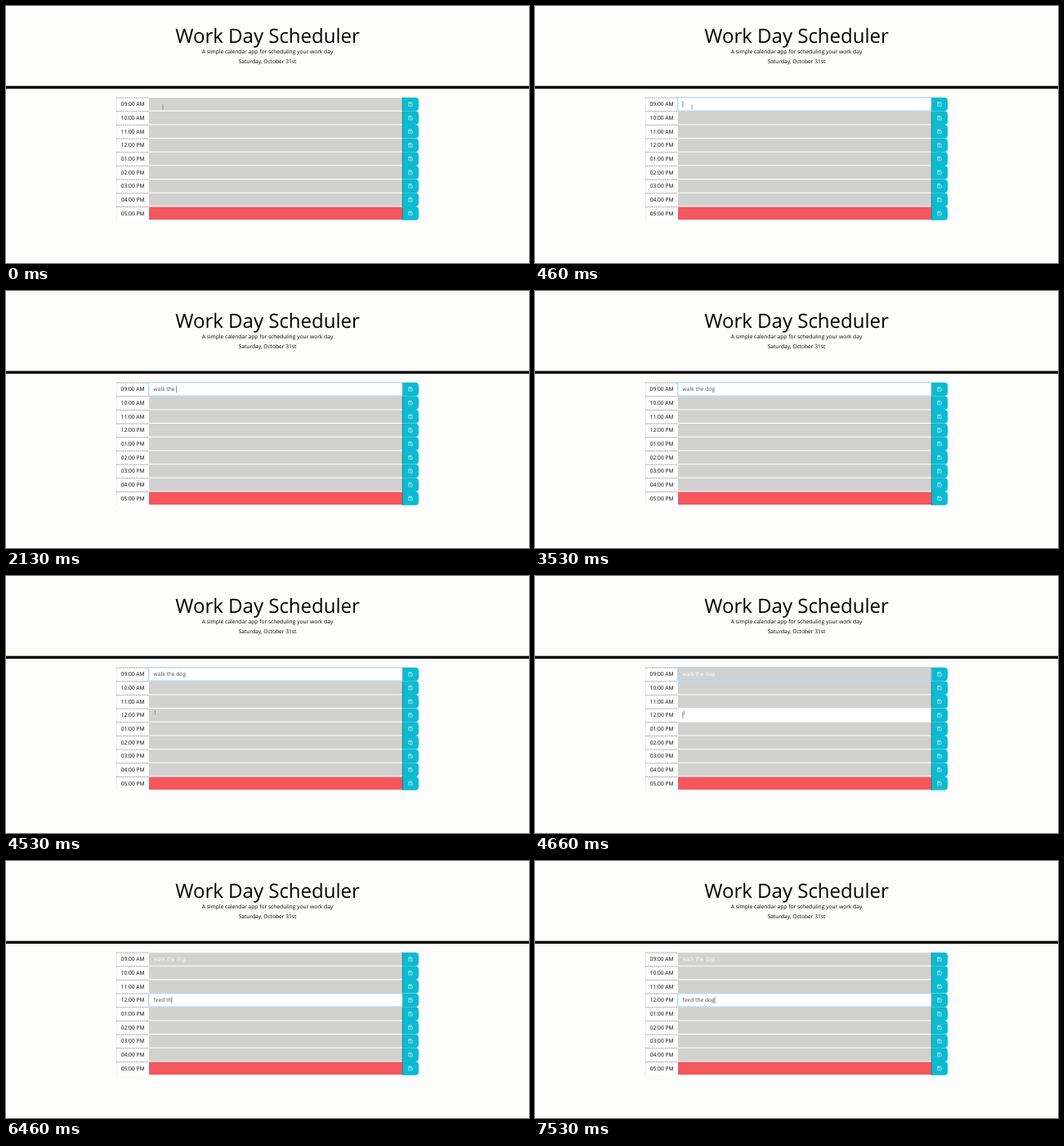
Animation, 640 px wide and 314 px high, one loop 8000 ms. Source, as an HTML page:

```html
<!DOCTYPE html>
<html lang="en">
<head>
<meta charset="utf-8">
<title>Work Day Scheduler</title>
<style>
  html, body { margin: 0; width: 100%; height: 100%; overflow: hidden; background: #fdfdfc; }
  svg { display: block; width: 640px; height: 314px; }
  text { font: 6.667px "Open Sans", sans-serif; text-rendering: geometricPrecision; }
  .mid { text-anchor: middle; }
  .title { font-size: 24px; }
  .focus { fill: none; stroke: #92c3f0; stroke-width: .9; }
  .icon { fill: none; stroke: #d9f4f7; stroke-width: .6; }
</style>
</head>
<body>
<svg id="stage" viewBox="0 0 640 314">
  <text class="mid title" x="320" y="45">Work Day Scheduler</text>
  <text class="mid" x="320" y="58.3">A simple calendar app for scheduling your work day</text>
  <text class="mid" x="320" y="70.3">Saturday, October 31st</text>
  <rect y="97.7" width="640" height="3.4"/>
</svg>
<script>
const stage = document.getElementById('stage');
const LOOP = 8000, TOP = 111.7, PITCH = 16.667, TEXT_X = 180.6;
const GRAY = '#d1d1d0', RED = '#f5575f', TEAL = '#0cbbd0';

function add(tag, attrs, text = '') {
  const el = document.createElementNS('http://www.w3.org/2000/svg', tag);
  set(el, attrs);
  el.textContent = text;
  return stage.appendChild(el);
}
function set(el, attrs) {
  for (const k in attrs) el.setAttribute(k, attrs[k]);
}

const hours = ['09:00 AM', '10:00 AM', '11:00 AM', '12:00 PM', '01:00 PM',
  '02:00 PM', '03:00 PM', '04:00 PM', '05:00 PM'];

const fields = hours.map((hour, i) => {
  const y = TOP + i * PITCH;
  add('rect', { x: 135, y, width: 370, height: PITCH, fill: '#fff', rx: 4 });
  add('path', { d: `M135.3 ${y + .4}v${PITCH}`, stroke: '#ddd', 'stroke-width': .5 });
  add('path', { d: `M135 ${y + .4}h40`, stroke: '#444', 'stroke-width': .6, 'stroke-dasharray': '1 .6' });
  add('text', { class: 'mid', x: 155.1, y: y + 10.7 }, hour);
  const field = add('rect', { x: 175, y: y + .4, width: 310, height: 15.6, fill: i < 8 ? GRAY : RED });
  add('path', {
    d: `M485 ${y}h15.7q4.3 0 4.3 4.3v${PITCH - 8.6}q0 4.3 -4.3 4.3h-15.7z`, fill: TEAL
  });
  add('path', { d: `M485.2 ${y}v${PITCH}`, stroke: '#1c5f69', 'stroke-width': .6 });
  add('path', {
    class: 'icon',
    d: `M492.7 ${y + 6}h3.4l1.1 1.1v3.5h-4.5zM493.6 ${y + 6}v1.5h2.1v-1.5M494.4 ${y + 9}h1.1`
  });
  return field;
});

// Each entry: row, focus and blur times, typed text with the time of every key
const entries = [
  { row: 0, from: 260, to: 4600, text: 'walk the dog',
    keys: [1130, 1200, 1260, 1400, 1460, 1600, 1730, 2000, 2130, 2530, 2660, 3060] },
  { row: 3, from: 4600, to: LOOP, text: 'feed the dog',
    keys: [5460, 5600, 5800, 6060, 6200, 6400, 6460, 6600, 6730, 6800, 7330, 7530] }
];
const caretOff = [[0, 260], [730, 1130], [3530, 3930], [4530, 4600], [5200, 5460], [7260, 7330]];

for (const e of entries) {
  e.y = TOP + e.row * PITCH;
  e.glow = add('rect', { class: 'focus', x: 174.8, y: e.y + .1, width: 310.4, height: 16.3, rx: .6 });
  e.label = add('text', { x: TEXT_X, y: e.y + 10.7 });
}
const caret = add('path', { stroke: '#444', 'stroke-width': .6 });
const pointer = add('path', {
  d: 'M-.8 -2.6Q0 -2.6 0 -2V2Q0 2.6 -.8 2.6M.8 -2.6Q0 -2.6 0 -2V2Q0 2.6 .8 2.6',
  fill: 'none', stroke: '#777', 'stroke-width': .4
});

const within = (t, [a, b]) => t >= a && t < b;
const ramp = (t, start, span) => Math.min(1, Math.max(0, (t - start) / span));
const ease = p => p * p * (3 - 2 * p);

function draw(t) {
  for (const e of entries) {
    const active = within(t, [e.from, e.to]);
    const typed = e.text.slice(0, e.keys.filter(k => k <= t).length);
    e.label.textContent = typed.replace(/ /g, '\u00a0');
    set(e.label, { fill: active ? '#495057' : '#fff' });
    set(fields[e.row], { fill: active ? '#fff' : GRAY });
    set(e.glow, { opacity: ease(ramp(t, e.from + 40, 150)) - ease(ramp(t, e.to + 40, 150)) });
    if (active) {
      const x = TEXT_X + .3 + (typed ? e.label.getComputedTextLength() : 0);
      set(caret, { d: `M${x} ${e.y + 4.3}v8` });
    }
  }
  set(caret, { opacity: caretOff.some(s => within(t, s)) ? 0 : 1 });

  const move = ease(ramp(t, 3930, 330));
  set(pointer, {
    transform: `translate(${192 - 9.5 * move} ${123.5 + 43.5 * move})`,
    opacity: t < 1130 || within(t, [3930, 5460]) ? 1 : 0
  });
}

function tick() {
  draw(performance.now() % LOOP);
  requestAnimationFrame(tick);
}
tick();
</script>
</body>
</html>
```
